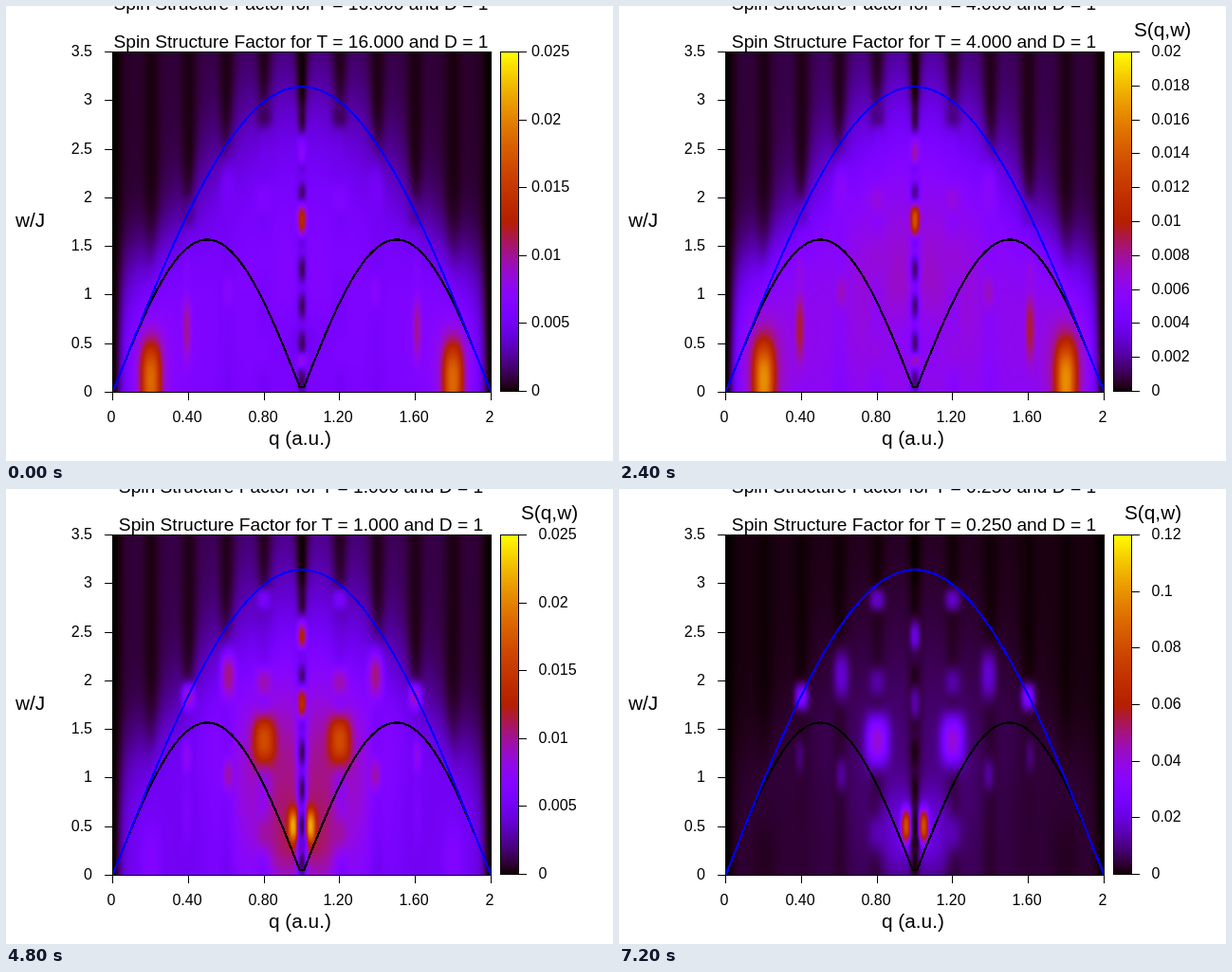
An HTML page with a canvas for the animation above (8000 ms loop, 640x480 px).

```html
<!DOCTYPE html>
<html>
<head>
<meta charset="utf-8">
<style>
html, body { margin: 0; width: 640px; height: 480px; overflow: hidden; background: #fff; }
canvas, svg { position: absolute; left: 0; top: 0; display: block; }
text { font-family: "Liberation Sans", Arial, sans-serif; font-size: 16px; fill: #000; }
.title { font-size: 19.2px; text-anchor: middle; }
.name { font-size: 20.8px; }
.end { text-anchor: end; }
.mid { text-anchor: middle; }
path { fill: none; stroke: #000; shape-rendering: crispEdges; }
</style>
</head>
<body>
<canvas id="heat" width="640" height="480"></canvas>
<svg id="stage" width="640" height="480" viewBox="0 0 640 480"></svg>
<script>
const HOLD = 1200, LOOP = 8000;
const LEFT = 113, RIGHT = 511, TOP = 48, BOTTOM = 407;
const W = RIGHT - LEFT, H = BOTTOM - TOP;
const { PI, sin, cos, exp, abs, round } = Math;
const px = q => LEFT - .5 + q * (W + 1) / 2;
const py = w => BOTTOM + .5 - w * H / 3.5;

// Top of the colour scale at each halving of T, in thousandths.
const scaleMax = [25, 25, 20, 20, 25, 60, 120];

// Resonances: q, w, half width, half height, hot level, cold level.
const spots = [
  [.3, .5, .28, .9, 6.5, 4],
  [.2, .2, .1, .48, 9, 3],
  [.2, .12, .052, .38, 18.7, 2.2],
  [.39, .65, .023, .32, 10, 3.5],
  [.39, 1.22, .023, .16, 6.3, 9.5],
  [.4, 1.83, .035, .13, 2.5, 34],
  [.61, 1.03, .028, .16, 7, 13],
  [.61, 2.05, .04, .24, 5.3, 20],
  [.8, 2.83, .04, .11, 1.5, 20],
  [.8, 1.98, .045, .15, 6.3, 14],
  [.8, 1.38, .06, .26, 6, 46],
  [.8, .43, .05, .18, 6.3, 14],
  [.93, .45, .11, .45, 5.5, 22],
  [.955, .5, .027, .17, 5, 96]
];
const middle = [
  [1, 2.45, .026, .14, 7.3, 22],
  [1, 1.76, .025, .17, 13.5, 14],
  [1, .32, .025, .07, 8, 2]
];

// Levels run geometrically from hot to cold.
const mix = (hot, cold, c) => hot * (cold / hot) ** c;

function field(c) {
  const bulk = mix(4.2, 3, c), top = mix(1.2, 1.9, c);
  const core = mix(1, 4.5, c) + 12 * c * (1 - c);
  const dip = c * c / 2;
  const levels = list => list.map(([q, w, rx, ry, hot, cold]) => [q, w, rx, ry, mix(hot, cold, c)]);
  const side = levels(spots), mid = levels(middle);

  return (q, w) => {
    const stripe = cos(PI * q / .2) ** 4;
    const edge = .3 + .85 * PI * sin(PI * q / 2);
    const inside = 1 / (1 + exp((w - edge) / (.36 - .23 * stripe)));
    const hump = core * exp(-(((q - 1) / .57) ** 2) - ((w - 1) / 1.2) ** 2);
    let v = top * (.5 + .7 * q) * (1 - .68 * stripe) + (bulk + hump) * inside * (1 - dip * stripe);
    const blend = ([a, b, rx, ry, goal]) => {
      const dx = abs(q - a) / rx, dy = abs(w - b) / ry;
      if (dx < 2.4 && dy < 2.4) v += (goal - v) * exp(-(dx ** 2.5) - dy ** 2.5);
    };
    side.forEach(blend);
    // Rippled dark column at q = 1, fading to black above the dome.
    const ripple = 2.6 * exp(-.6 * cos(2 * PI * (w - .5) / .38)) / (1 + exp((w - 2.8) / .08));
    blend([1, w, .023, 1, ripple + .1]);
    mid.forEach(blend);
    return v * (1 - exp(-((q / .04) ** 2)));
  };
}

function color(v) {
  const x = Math.min(1, Math.max(0, v));
  return [Math.sqrt(x), x ** 3, Math.max(0, sin(2 * PI * x))].map(u => round(u * 255));
}

const ctx = document.getElementById("heat").getContext("2d");

function heatmap(T, max) {
  const img = ctx.createImageData(W, H), level = field(1 / (1 + T * T));
  for (let y = 0; y < H; y++) {
    const w = (H - y - .5) * 3.5 / H;
    for (let x = 0; x < W / 2; x++) {
      const rgb = [...color(level((x + .5) * 2 / W, w) / max), 255];
      img.data.set(rgb, (y * W + x) * 4);
      img.data.set(rgb, (y * W + W - 1 - x) * 4);
    }
  }
  return img;
}

const svg = document.getElementById("stage");

function add(tag, attrs, parent = svg) {
  const el = document.createElementNS(svg.namespaceURI, tag);
  for (const k in attrs) el.setAttribute(k, attrs[k]);
  parent.appendChild(el);
  return el;
}

function label(str, x, y, cls = "", parent = svg) {
  const el = add("text", { x, y, class: cls }, parent);
  el.textContent = str;
  return el;
}

function curve(f, stroke) {
  let d = "";
  for (let i = 0; i < 100; i++) {
    const q = i * 2 / 99;
    d += (i ? "L" : "M") + px(q).toFixed(2) + " " + py(f(q)).toFixed(2);
  }
  add("path", { d, style: `stroke:${stroke};stroke-width:2.2` });
}

function drawAxes() {
  let d = "M112.5 48.5H511.5V407.5H112.5Z";
  for (let i = 0; i <= 7; i++) {
    const y = round(py(i / 2) - .5);
    d += `M104 ${y + .5}H113`;
    label(i / 2, 91, y + 5, "end");
  }
  for (let i = 0; i <= 5; i++) {
    const q = i * .4, x = round(px(q) - .5);
    d += `M${x + .5} 407V416`;
    label(i % 5 ? q.toFixed(2) : q, x - 1, 439, "mid");
  }
  add("path", { d });
  label("w/J", 10, 233, "name");
  label("q (a.u.)", 277, 463, "name");
}

function drawBar() {
  for (let y = TOP; y < BOTTOM; y++) {
    ctx.fillStyle = `rgb(${color((BOTTOM - y - .5) / H)})`;
    ctx.fillRect(522, y, 19, 1);
  }
}

curve(q => PI / 2 * abs(sin(PI * q)), "#000");
curve(q => PI * sin(PI * q / 2), "#00f");
drawAxes();
drawBar();

const titles = [4, 44].map(y => label("", 311, y, "title"));
const scale = add("g", {});

function drawScale(max, named) {
  scale.textContent = "";
  const step = [2, 5, 10, 20].find(s => max / s <= 10);
  let d = "M521.5 48.5H540.5V406.5H521.5Z";
  for (let v = 0; v <= max; v += step) {
    const y = round(406 - v / max * 358);
    d += `M541 ${y + .5}H549`;
    label(v / 1000, named ? 561.5 : 554, y + 5, "", scale);
  }
  add("path", { d }, scale);
  if (named) label("S(q,w)", step < 10 ? 543 : 533, 32, "name", scale);
}

const maps = [];
let shown = -1;

function show(i) {
  if (i === shown) return;
  shown = i;
  const T = 16 / 2 ** i, max = scaleMax[i];
  maps[i] = maps[i] || heatmap(T, max);
  ctx.putImageData(maps[i], LEFT, TOP);
  for (const t of titles) t.textContent = `Spin Structure Factor for T = ${T.toFixed(3)} and D = 1`;
  drawScale(max, i > 0);
}

const start = performance.now();

function tick() {
  show(Math.floor((performance.now() - start) % LOOP / HOLD));
  requestAnimationFrame(tick);
}

tick();
</script>
</body>
</html>
```
